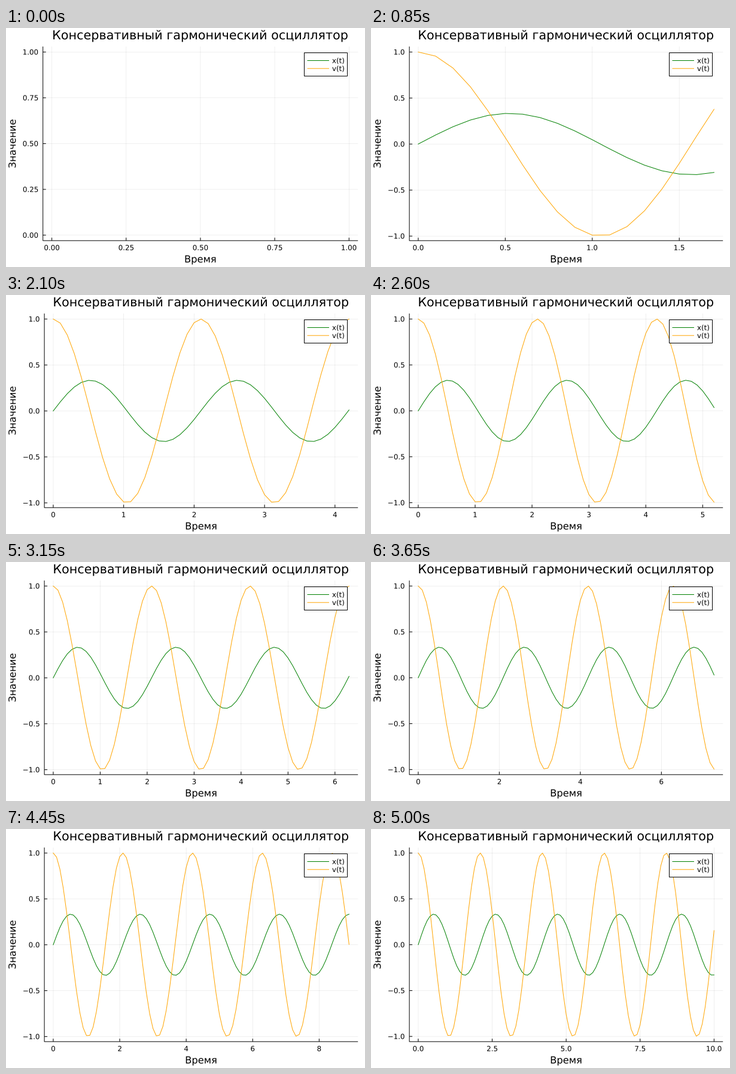
A matplotlib script that plays this animation: 600 px wide and 400 px high, repeating every 5050 ms.

```python
import math

import numpy as np
import matplotlib.pyplot as plt
from matplotlib.animation import FuncAnimation
from matplotlib.patches import PathPatch, Rectangle
from matplotlib.textpath import TextPath
from matplotlib.transforms import Affine2D

W, H, DPI = 600, 400, 100
FRAMES, STEP_MS = 101, 50
DT, OMEGA = 0.1, 3.0
TOP, BOTTOM, RIGHT = 31.0, 355.9, 588.2
EM = 1.483                      # pixels of em size per point
TICK = 5
GREEN, ORANGE = "#008000", "#ffa500"
NICE = [(1, 1.0), (5, 0.9), (2, 0.7), (2.5, 0.5), (3, 0.2)]

plt.rcParams["font.family"] = "DejaVu Sans"
fig = plt.figure(figsize=(W / DPI, H / DPI), dpi=DPI, facecolor="white")
ax = fig.add_axes([0, 0, 1, 1])
ax.set_xlim(0, W)
ax.set_ylim(H, 0)
ax.axis("off")


def line(xs, ys, color="black", px=1.0, z=2, **kw):
    return ax.plot(xs, ys, color=color, lw=px * 72 / DPI, zorder=z,
                   snap=False, **kw)[0]


def text(x, y, s, pt=8, align=0.5, angle=0):
    """Outline text on baseline y; align 0, 0.5, 1 is left, centre, right."""
    path = TextPath((0, 0), s, size=pt * EM)
    box = path.get_extents()
    place = (Affine2D().translate(-box.x0 - align * box.width, 0)
             .scale(1, -1).rotate_deg(-angle).translate(x, y))
    return ax.add_patch(PathPatch(place.transform_path(path), fc="black",
                                  lw=0, zorder=6, snap=False))


def widen(lo, hi):
    if hi == lo:
        hi = lo + 1
    pad = 0.03 * (hi - lo)
    return lo - pad, hi + pad


def best_ticks(lo, hi):
    """Score candidate steps by count, coverage and niceness."""
    span = hi - lo
    z0 = math.ceil(math.log10(span))
    found = []
    for z in range(z0, z0 - 3, -1):
        for rank, (q, nice) in enumerate(NICE):
            step = q * 10.0 ** z
            first, last = math.ceil(lo / step), math.floor(hi / step)
            n = last - first + 1
            outer = math.ceil(hi / step) - math.floor(lo / step)
            if not 4 <= n <= 8 or outer * step >= 2 * span:
                continue
            grain = 1 - abs(n - 5) / 5
            cover = 1.5 * span / ((n - 1) * step)
            score = grain / 4 + 1 / 6 + cover / 3 + nice / 4
            found.append((-round(score, 9), -z, outer, rank, step, first, last))
    step, first, last = min(found)[4:]
    return [i * step for i in range(first, last + 1)]


def labels(ticks):
    digits = 0
    while any(abs(t - round(t, digits)) > 1e-9 for t in ticks):
        digits += 1
    return [f"{t + 0.0:.{digits}f}".replace("-", "\u2212") for t in ticks]


def label_width(s):
    em = sum({".": 0.318, "\u2212": 0.838}.get(c, 0.636) for c in s)
    return em * 8 * EM


text(16.2, (TOP + BOTTOM) / 2, "Значение", 11, angle=90)

ax.add_patch(Rectangle((498.5, 41.5), 72, 39, fc="white", ec="black",
                       lw=0.72, zorder=4, snap=False))
for y, color, name in ((54.5, GREEN, "x(t)"), (67.8, ORANGE, "v(t)")):
    line([504, 539.5], [y, y], color, z=5)
    text(545.3, y + 4.2, name, align=0)

x_curve = line([], [], GREEN, z=3)
v_curve = line([], [], ORANGE, z=3)
moving = []


def draw(k):
    while moving:
        moving.pop().remove()

    t = DT * np.arange(k + 1)
    x, v = np.sin(OMEGA * t) / OMEGA, np.cos(OMEGA * t)
    t0, t1 = widen(0, t[-1])
    y0, y1 = widen(min(x.min(), v.min()), max(x.max(), v.max()))
    t_ticks, y_ticks = best_ticks(t0, t1), best_ticks(y0, y1)
    y_names = labels(y_ticks)
    left = 35.3 + max(map(label_width, y_names))
    mid = (left + RIGHT) / 2

    def px(a):
        return left + (a - t0) / (t1 - t0) * (RIGHT - left)

    def py(a):
        return BOTTOM - (a - y0) / (y1 - y0) * (BOTTOM - TOP)

    def rule(xs, ys, **kw):
        moving.append(line(xs, ys, solid_capstyle="butt",
                           solid_joinstyle="miter", **kw))

    rule([left, left, RIGHT], [TOP, BOTTOM, BOTTOM])
    for a, name in zip(t_ticks, labels(t_ticks)):
        p = px(a)
        rule([p, p], [TOP, BOTTOM], px=0.6, z=1, alpha=0.1)
        rule([p, p], [BOTTOM, BOTTOM - TICK])
        moving.append(text(p, 371.8, name))
    for a, name in zip(y_ticks, y_names):
        p = py(a)
        rule([left, RIGHT], [p, p], px=0.6, z=1, alpha=0.1)
        rule([left, left + TICK], [p, p])
        moving.append(text(left - 8.4, p + 4.3, name, align=1))
    moving.append(text(mid, 19, "Консервативный гармонический осциллятор", 14))
    moving.append(text(mid, 392.4, "Время", 11))

    x_curve.set_data(px(t), py(x))
    v_curve.set_data(px(t), py(v))
    for curve in (x_curve, v_curve):
        curve.set_visible(k > 0)
    return []


anim = FuncAnimation(fig, draw, frames=FRAMES, interval=STEP_MS,
                     init_func=lambda: draw(0), repeat=True, repeat_delay=0,
                     blit=False)
plt.show()
```
